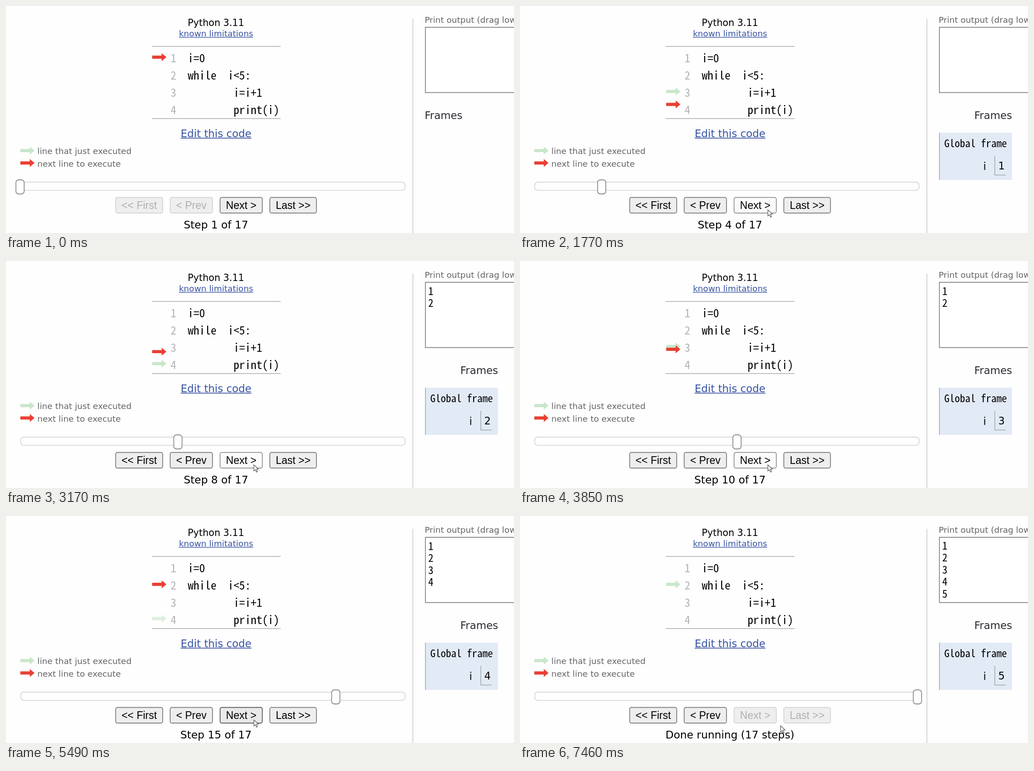
Animation, 1119 px wide and 500 px high, one loop 7.5 s. Source, as an HTML page with a canvas:

```html
<!DOCTYPE html>
<html lang="en">
<head>
<meta charset="utf-8">
<title>Stepping through a loop</title>
<style>
html, body { margin: 0; width: 100%; height: 100%; overflow: hidden; background: #fefefe; }
canvas { display: block; }
</style>
</head>
<body>
<canvas id="stage" width="1119" height="500"></canvas>
<script>
const LOOP = 7500;
const PRESS = 115;   // how long the button is held before each click
const FADE = 200, SLIDE = 250;
const RED = '#e93f34', GREEN = '#c9e6ca', LINK = '#3853a4', GREY = '#666';
const SANS = '"DejaVu Sans", Verdana, sans-serif';
const MONO = '"Noto Sans Mono CJK SC", "Noto Sans Mono CJK JP", "Liberation Mono", monospace';
const ARIAL = '"Liberation Sans", Arial, sans-serif';

// Click that leads to step 2, 3, ... 17 and finally to "done" (18)
const clicks = [670, 1050, 1420, 1790, 2150, 2510, 2860, 3210, 3565,
                3960, 4290, 4619, 5030, 5400, 5780, 6250, 6610];
const code = ['i=0', 'while  i<5:', '        i=i+1', '        print(i)'];

const ctx = document.getElementById('stage').getContext('2d');
const clamp = v => Math.max(0, Math.min(1, v));
const ease = p => p < .5 ? 4 * p ** 3 : 1 - 4 * (1 - p) ** 3;
const lineOf = step => step < 2 ? 1 : 2 + (step - 2) % 3;
const clickOf = step => clicks[step - 2];
const rowTop = row => 104 + 37.8 * (row - 1);

function text(str, x, y, size, color = '#000', font = SANS, align = 'left', weight = 400) {
  ctx.font = `${weight} ${size}px ${font}`;
  ctx.textAlign = align;
  ctx.fillStyle = color;
  ctx.fillText(str, x, y);
}

// Monospaced text, sized by the advance of one character
function mono(str, x, y, cell, color = '#000') {
  ctx.font = `300 100px ${MONO}`;
  const size = 100 * cell / ctx.measureText('0').width;
  text(str, x, y, size, color, MONO, 'left', 300);
}

function link(str, y, size, thick) {
  text(str, 462.7, y, size, LINK, SANS, 'center');
  const w = ctx.measureText(str).width;
  ctx.fillRect(462.7 - w / 2, y + 1.5, w, thick);
}

function box(x, y, w, h, r, fill, stroke, width = 1.7) {
  ctx.beginPath();
  ctx.roundRect(x, y, w, h, r);
  ctx.fillStyle = fill;
  ctx.fill();
  ctx.strokeStyle = stroke;
  ctx.lineWidth = width;
  ctx.stroke();
}

function rect(x, y, w, h, color) {
  ctx.fillStyle = color;
  ctx.fillRect(x, y, w, h);
}

function polygon(points, x, y, scale, fill) {
  ctx.beginPath();
  points.forEach(([px, py]) => ctx.lineTo(x + px * scale, y + py * scale));
  ctx.closePath();
  ctx.fillStyle = fill;
  ctx.fill();
}

function arrow(x, y, color, alpha = 1) {
  ctx.globalAlpha = alpha;
  polygon([[0, 3], [12, 3], [12, 0], [18, 5], [12, 10], [12, 7], [0, 7]], x, y, 1.74, color);
  ctx.globalAlpha = 1;
}

function button(label, x, w, state) {
  const [fill, stroke, ink] = {
    normal: ['#eee', '#767676', '#000'],
    hover: ['#e9e9e9', '#505050', '#000'],
    active: ['#fbfbfb', '#8d8d8d', '#000'],
    disabled: ['#eee', '#d2d2d2', '#b0b0b0']
  }[state];
  box(x, 421.6, w, 34.6, 4, fill, stroke);
  text(label, x + w / 2, 446.5, 23, ink, ARIAL, 'center');
}

function cursorAt(t) {
  if (t < 40) return null;
  const into = 1 - (1 - clamp((t - 20) / 260)) ** 2;
  const out = ease(clamp((t - 7160) / 300));
  return [654 - 108 * into + 28 * out, 494 - 45 * into + 13 * out];
}

function drawCursor([x, y]) {
  polygon([[0, 0], [0, 13.5], [3.2, 10.6], [5.6, 16], [8, 15], [5.6, 9.8], [10, 9.6]], x, y, 1, '#fff');
  ctx.strokeStyle = '#444';
  ctx.lineWidth = 1.1;
  ctx.stroke();
}

function drawArrows(t, step) {
  // The old mark fades out, then reappears on the line just executed
  if (step > 1) {
    const p = (t - clickOf(step)) / FADE;
    if (p >= 1) arrow(322, rowTop(lineOf(step - 1)), GREEN);
    else if (step > 2) arrow(322, rowTop(lineOf(step - 2)), GREEN, 1 - ease(clamp(p)));
  }
  if (step > 17) return;
  const moving = 1 + clicks.filter(c => t >= c + FADE).length;
  let y = rowTop(lineOf(moving));
  if (moving > 1) {
    const from = rowTop(lineOf(moving - 1));
    y = from + (y - from) * ease(clamp((t - clickOf(moving) - FADE) / SLIDE));
  }
  arrow(322, y, RED);
}

function drawCode(t, step) {
  text('Python 3.11', 462.5, 43.7, 20.7, '#000', SANS, 'center');
  link('known limitations', 66.8, 18.5, 1.4);
  rect(321, 88.3, 284, 1.7, '#b4b4b4');
  rect(321, 247, 284, 1.7, '#b4b4b4');
  code.forEach((line, i) => {
    const y = 124 + 38 * i;
    mono(i + 1, 362.5, y, 12.6, '#b4b4b4');
    mono(line, 400.5, y, 12.6);
  });
  drawArrows(t, step);
  link('Edit this code', 288.7, 22.9, 1.7);
  arrow(31.5, 309.8, GREEN);
  arrow(31.5, 337, RED);
  text('line that just executed', 69, 326, 18.5, GREY);
  text('next line to execute', 69, 354, 18.5, GREY);
}

function drawControls(t, step, cursor) {
  box(32.3, 387.8, 846.8, 18.2, 7, '#fefefe', '#d4d4d4');
  box(21.8 + 49.68 * (step - 1), 383, 18.2, 31, 6, '#fff', '#8c8c8c', 1.8);

  const start = step < 2 ? 'disabled' : 'normal';
  const end = step > 17 ? 'disabled' : 'normal';
  const over = cursor && cursor[0] < 565 && cursor[1] < 457;
  const pressed = clicks.some(c => t >= c - PRESS && t < c);
  button('<< First', 241.6, 103.6, start);
  button('< Prev', 361.6, 93.2, start);
  button('Next >', 471.6, 93, step > 17 ? 'disabled' : pressed ? 'active' : over ? 'hover' : 'normal');
  button('Last >>', 581.2, 102.6, end);

  const status = step > 17 ? 'Done running (17 steps)' : `Step ${step} of 17`;
  text(status, 462.5, 490, 23.3, '#000', SANS, 'center');
}

function drawState(step) {
  rect(895.5, 28, 1.7, 472, '#ccc');
  text('Print output (drag lower right corner to resize)', 922.3, 37, 18.45, GREY);
  box(923.8, 46.8, 300, 143.9, 0, '#fff', '#808080');
  const printed = Math.floor((step - 2) / 3);
  const scroll = printed > 4 ? 1 : 0;
  for (let n = 1; n <= printed; n++) {
    mono(n, 930, 74.5 + 26.5 * (n - 1) - scroll, 11.5);
  }

  if (step < 2) {
    text('Frames', 922.3, 248.6, 22.9, '#2b2b33');
    return;
  }
  text('Frames', 1084, 248.6, 22.9, '#2b2b33', SANS, 'right');
  rect(923, 279, 160.5, 104, '#e2eaf6');
  rect(923, 279, 1.7, 104, '#a6adb3');
  mono('Global frame', 934.5, 311, 11.5);
  text('i', 1020.5, 360.5, 22.5);
  rect(1045, 330, 1.7, 43, '#a6adb3');
  rect(1045, 371.5, 25, 1.7, '#a6adb3');
  text(Math.min(5, Math.floor((step - 1) / 3)), 1060.6, 360, 22.5, '#000', SANS, 'center');
}

function draw(now) {
  const t = now % LOOP;
  const step = 1 + clicks.filter(c => t >= c).length;
  const cursor = cursorAt(t);
  rect(0, 0, 1119, 500, '#fefefe');
  drawCode(t, step);
  drawControls(t, step, cursor);
  drawState(step);
  if (cursor) drawCursor(cursor);
}

const begin = performance.now();
function tick() {
  draw(performance.now() - begin);
  requestAnimationFrame(tick);
}
tick();
</script>
</body>
</html>
```
